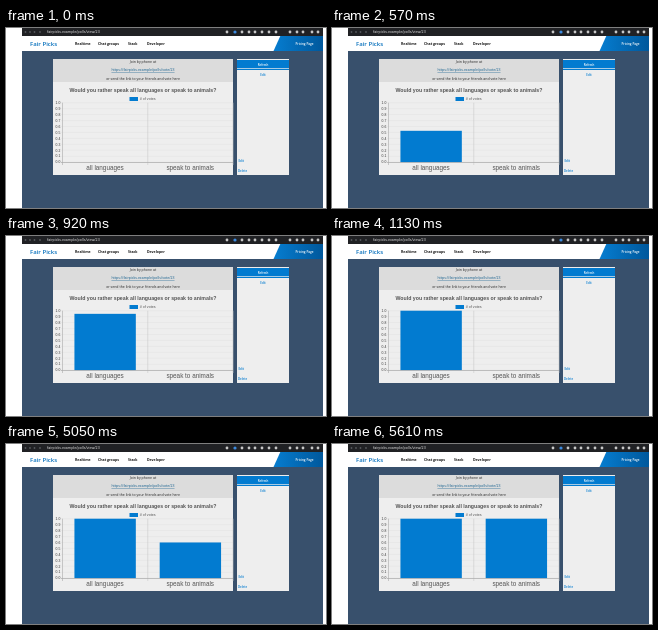
An HTML page for the animation above (8 s loop, 320 by 180 pixels).

```html
<!DOCTYPE html>
<html lang="en">
<head>
<meta charset="utf-8">
<title>Poll results</title>
<style>
  html, body { margin: 0; width: 100%; height: 100%; overflow: hidden; background: #fff; }
  svg { display: block; width: 100%; height: 100%; }
  text { font-family: "Open Sans", sans-serif; font-size: 3.5px; }
  .chart text { font-family: "Liberation Sans", Arial, sans-serif; fill: #555; }
  .mid { text-anchor: middle; }
  .bold { font-weight: 700; }
  .blue { fill: #027bd0; }
  .small text { font-size: 2.9px; font-weight: 600; }
</style>
</head>
<body>
<svg viewBox="0 0 320 180">
  <defs>
    <linearGradient id="wedge">
      <stop offset="0" stop-color="#067dd0"/>
      <stop offset="1" stop-color="#00589c"/>
    </linearGradient>
  </defs>

  <!-- Browser bar -->
  <rect x="16" width="301" height="8" fill="#202124"/>
  <g id="icons"></g>
  <text x="41" y="5.3" fill="#eee" style="font-size:3.6px">fairpicks.example/polls/view/23</text>

  <!-- Site header -->
  <text x="24" y="18.2" fill="#0871bd" style="font-size:6px;font-weight:600">Fair Picks</text>
  <g class="bold" fill="#111">
    <text x="69" y="17.2">Realtime</text>
    <text x="92" y="17.2">Chat groups</text>
    <text x="122" y="17.2">Stack</text>
    <text x="141" y="17.2">Developer</text>
  </g>
  <path d="M274.3 8H317V23H267.5Z" fill="url(#wedge)"/>
  <text class="mid" x="298.5" y="17.2" fill="#fff" style="font-size:3.1px;font-weight:600">Pricing Page</text>

  <!-- Page -->
  <rect x="16" y="23" width="301" height="157" fill="#38506c"/>
  <rect x="47" y="31" width="180" height="116" fill="#eee"/>
  <rect x="47" y="31" width="180" height="23" fill="#dcdcdc"/>
  <g class="mid" fill="#222">
    <text x="137" y="35">Join by phone at</text>
    <text x="137" y="43.2" fill="#0f5c8c" text-decoration="underline">https://fairpicks.example/polls/vote/23</text>
    <text x="137" y="51.5">or send the link to your friends and vote here</text>
  </g>

  <!-- Sidebar -->
  <rect x="231" y="31" width="52" height="116" fill="#eee"/>
  <rect class="blue" x="231" y="32" width="52" height="8.3"/>
  <rect class="blue" x="231" y="41" width="52" height="1"/>
  <g class="blue small">
    <text class="mid" x="257" y="37.6" fill="#fff">Refresh</text>
    <text class="mid" x="257" y="48">Edit</text>
    <text x="232.5" y="134">Edit</text>
    <text x="232" y="143.8">Delete</text>
  </g>

  <!-- Chart -->
  <g class="chart">
    <text class="mid bold" x="137" y="63.8" style="font-size:5.22px">Would you rather speak all languages or speak to animals?</text>
    <rect class="blue" x="123.5" y="69" width="8.5" height="4"/>
    <text x="133.7" y="72.3" style="font-size:3.7px"># of votes</text>
    <g id="grid"></g>
    <rect class="blue" id="bar0"/>
    <rect class="blue" id="bar1"/>
    <path d="M55 134.5H227" stroke="#aaa" stroke-width=".7"/>
    <text class="mid" x="99" y="142.3" style="font-size:6.35px">all languages</text>
    <text class="mid" x="184.2" y="142.3" style="font-size:6.35px">speak to animals</text>
  </g>
</svg>
<script>
  const LOOP = 8000, STEP = 70;
  const LEFT = 56.5, RIGHT = 227, TOP = 74.7, BASE = 134.2;
  const CATEGORY = (RIGHT - LEFT) / 2, BAR = CATEGORY * 0.72;
  const SVG = "http://www.w3.org/2000/svg";
  const byId = id => document.getElementById(id);

  function add(parent, tag, attrs, text = "") {
    const node = document.createElementNS(SVG, tag);
    for (const key in attrs) node.setAttribute(key, attrs[key]);
    node.textContent = text;
    parent.append(node);
  }

  const icons = byId("icons");
  for (const x of [19.5, 24, 28.5, 34])
    add(icons, "circle", { cx: x, cy: 4, r: 0.9, fill: "#55585c" });
  for (const x of [221, 236, 243, 249, 256, 263, 270, 284, 291, 297, 306, 312])
    add(icons, "circle", { cx: x, cy: 4, r: 1.4, fill: "#c8c8c8" });
  add(icons, "circle", { cx: 229, cy: 4, r: 1.6, fill: "#3c8be0" });

  const grid = byId("grid");
  for (let i = 0; i <= 10; i++) {
    const y = TOP + (BASE - TOP) * i / 10;
    add(grid, "path", { d: `M55 ${y}H${RIGHT}`, stroke: "#dfdfdf", "stroke-width": 0.4 });
    add(grid, "text", { x: 54.3, y: y + 1.2, "text-anchor": "end", style: "font-size:3.4px;fill:#333" },
      (1 - i / 10).toFixed(1));
  }
  for (let i = 0; i <= 2; i++)
    add(grid, "path", {
      d: `M${LEFT + i * CATEGORY} ${TOP}V137`, stroke: i ? "#ccc" : "#aaa", "stroke-width": 0.6
    });

  // "lead" is how far the growth has already run when the bar first shows.
  const bars = [
    { node: byId("bar0"), shown: 500, last: 1130, lead: 101 },
    { node: byId("bar1"), shown: 4910, last: 5610, lead: 65 }
  ];
  bars.forEach(({ node }, i) => {
    node.setAttribute("x", LEFT + CATEGORY * (i + 0.5) - BAR / 2);
    node.setAttribute("width", BAR);
  });

  const easeOutQuart = p => 1 - (1 - p) ** 4;

  function barValue({ shown, last, lead }, time) {
    if (time < shown) return 0;
    if (time >= last) return 1;
    const elapsed = Math.floor((time - shown) / STEP) * STEP + lead;
    return easeOutQuart(elapsed / 1000);
  }

  function draw(now) {
    for (const bar of bars) {
      const height = (BASE - TOP) * barValue(bar, now % LOOP);
      bar.node.setAttribute("y", BASE - height);
      bar.node.setAttribute("height", height);
    }
    requestAnimationFrame(draw);
  }
  draw(0);
</script>
</body>
</html>
```
